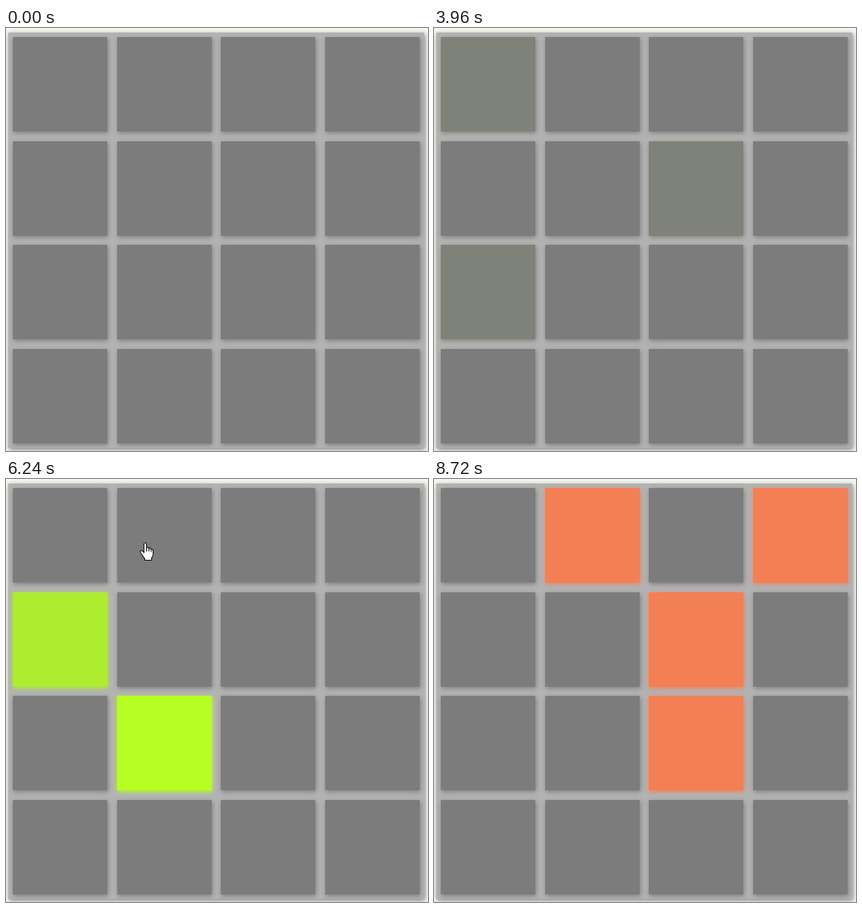
Animation of 558x560 px, one loop 9.28 s. Source, as an HTML page with a canvas:

```html
<!DOCTYPE html>
<html lang="en">
<head>
<meta charset="utf-8">
<title>Memory tiles</title>
<style>
html, body { margin: 0; width: 558px; height: 560px; overflow: hidden; background: #f4f7ee; }
canvas { display: block; }
</style>
</head>
<body>
<canvas id="stage" width="558" height="560"></canvas>
<script>
const ctx = document.getElementById('stage').getContext('2d');
const LOOP = 9280, STEP = 40, FADE = 500, SIZE = 125, PITCH = 137.5, LEFT = 9.25, TOP = 12.25;
const GRAY = [124, 124, 124], CORAL = [255, 127, 80], LIME = [183, 255, 34];
const PAGE = '#f4f7ee';

const tile = (col, row, click) => ({ col, row, click });
const rounds = [
  {
    show: 85, hide: 950, reset: 3590,
    tiles: [tile(0, 0, 1500), tile(0, 2, 2080), tile(2, 1, 2690)],
    pointer: { aim: [5, 8], enter: [1080, 2, 60], exit: [3920, 518, 180], gone: 3950 }
  },
  {
    show: 4200, hide: 5195, reset: 7805,
    tiles: [tile(1, 2, 5480), tile(0, 1, 5960), tile(1, 0, 6400), tile(3, 1, 6863)],
    pointer: { aim: [-4, -11], enter: [4600, 518, 180], exit: [7000, 543, 248], gone: 7090 }
  },
  { show: 8400, tiles: [tile(1, 0), tile(3, 0), tile(2, 1), tile(2, 2)] }
];
// Spans where the tiles stand still
const holds = [[520, 1080], [3960, 4240], [8160, 8440], [8720, LOOP]];

const tileX = col => LEFT + col * PITCH;
const tileY = row => TOP + row * PITCH;
const lerp = (a, b, k) => a + (b - a) * k;
const mix = (a, b, k) => a.map((v, i) => lerp(v, b[i], k));
const rgb = c => `rgb(${c.map(Math.round).join(',')})`;
const lastClick = r => r.tiles[r.tiles.length - 1].click;

// CSS "ease" curve
function ease(x) {
  if (x <= 0) return 0;
  if (x >= 1) return 1;
  const bez = (s, a, b) => 3 * (1 - s) ** 2 * s * a + 3 * (1 - s) * s * s * b + s ** 3;
  let lo = 0, hi = 1;
  for (let i = 0; i < 24; i++) {
    const mid = (lo + hi) / 2;
    if (bez(mid, 0.25, 0.25) < x) lo = mid; else hi = mid;
  }
  return bez(lo, 0.1, 1);
}

function tileColor(col, row, t) {
  let color = GRAY;
  const fade = (at, to) => { if (t > at) color = mix(color, to, ease((t - at) / FADE)); };
  for (const r of rounds) {
    const hit = r.tiles.find(p => p.col === col && p.row === row);
    if (!hit) continue;
    fade(r.show, CORAL);
    if (!r.hide) continue;
    fade(r.hide, GRAY);
    fade(hit.click, LIME);
    fade(r.reset, GRAY);
  }
  return rgb(color);
}

function box(x, y, size, color, shadow) {
  ctx.save();
  ctx.fillStyle = color;
  ctx.shadowColor = shadow;
  ctx.shadowOffsetX = 1;
  ctx.shadowOffsetY = 2;
  ctx.shadowBlur = 6;
  ctx.fillRect(x, y, size, size);
  ctx.restore();
}

// The pointer rests on each tile around its click and glides in between
function route({ tiles, pointer: { aim, enter, exit } }) {
  const stops = tiles.flatMap(({ col, row, click }) => {
    const x = tileX(col) + SIZE / 2 + aim[0], y = tileY(row) + SIZE / 2 + aim[1];
    return [[click - 80, x, y], [click + 40, x, y]];
  });
  return [enter, ...stops, exit];
}

function pointerAt(r, t) {
  const path = route(r);
  const i = path.findIndex(p => p[0] >= t);
  if (i < 0) return r.pointer.exit.slice(1);
  const b = path[i], a = path[i - 1] || b;
  const k = (t - a[0]) / (b[0] - a[0] || 1), s = k * k * (3 - 2 * k);
  return [lerp(a[1], b[1], s), lerp(a[2], b[2], s)];
}

function isHand(r, x, y, t) {
  const inside = v => v >= 0 && v % PITCH < SIZE;
  return t >= r.hide && t < lastClick(r) && inside(x - LEFT) && inside(y - TOP);
}

const arrow = new Path2D('M.5 .5V16.5L4.2 13L6.8 19L9.2 18L6.6 12.2H11.5Z');
const hand = new Path2D('M-1.5 1.5Q-1.5 -.5 0 -.5T1.7 1.5V6Q4.6 4.8 5 7Q7.4 6 8 8Q10.4 7.6 10.5 10' +
  'V14Q10.5 17 8.5 19.5V22.5H-.5V20.5Q-2.5 18.5 -4 15.5L-6.4 12Q-7.2 10 -5 9.8Q-3.6 10 -1.5 12.5Z');
const knuckles = new Path2D('M1.7 6V11M5 7V11M8 8V11.5');

function drawPointer(t) {
  const r = rounds.find(({ pointer: p }) => p && t >= p.enter[0] && t < p.gone);
  if (!r) return;
  const [x, y] = pointerAt(r, t);
  const grab = isHand(r, x, y, t), shape = grab ? hand : arrow;
  ctx.save();
  ctx.translate(Math.round(x), Math.round(y));
  ctx.fillStyle = '#fff';
  ctx.strokeStyle = '#111';
  ctx.lineWidth = 1.1;
  ctx.lineJoin = 'round';
  ctx.fill(shape);
  ctx.stroke(shape);
  if (grab) ctx.stroke(knuckles);
  ctx.restore();
}

function draw(t) {
  const hold = holds.find(([from, to]) => t >= from && t < to);
  const tileTime = hold ? hold[0] : t;
  ctx.fillStyle = PAGE;
  ctx.fillRect(0, 0, 558, 560);
  box(3, 6, 550, '#b3b3b3', '#808080');
  for (let row = 0; row < 4; row++) {
    for (let col = 0; col < 4; col++) {
      const color = tileColor(col, row, tileTime);
      box(Math.round(tileX(col)), Math.round(tileY(row)), SIZE, color, color);
    }
  }
  drawPointer(t);
}

const start = performance.now();
function tick() {
  const t = (performance.now() - start) % LOOP;
  draw(Math.floor(t / STEP) * STEP);
  requestAnimationFrame(tick);
}
tick();
</script>
</body>
</html>
```
